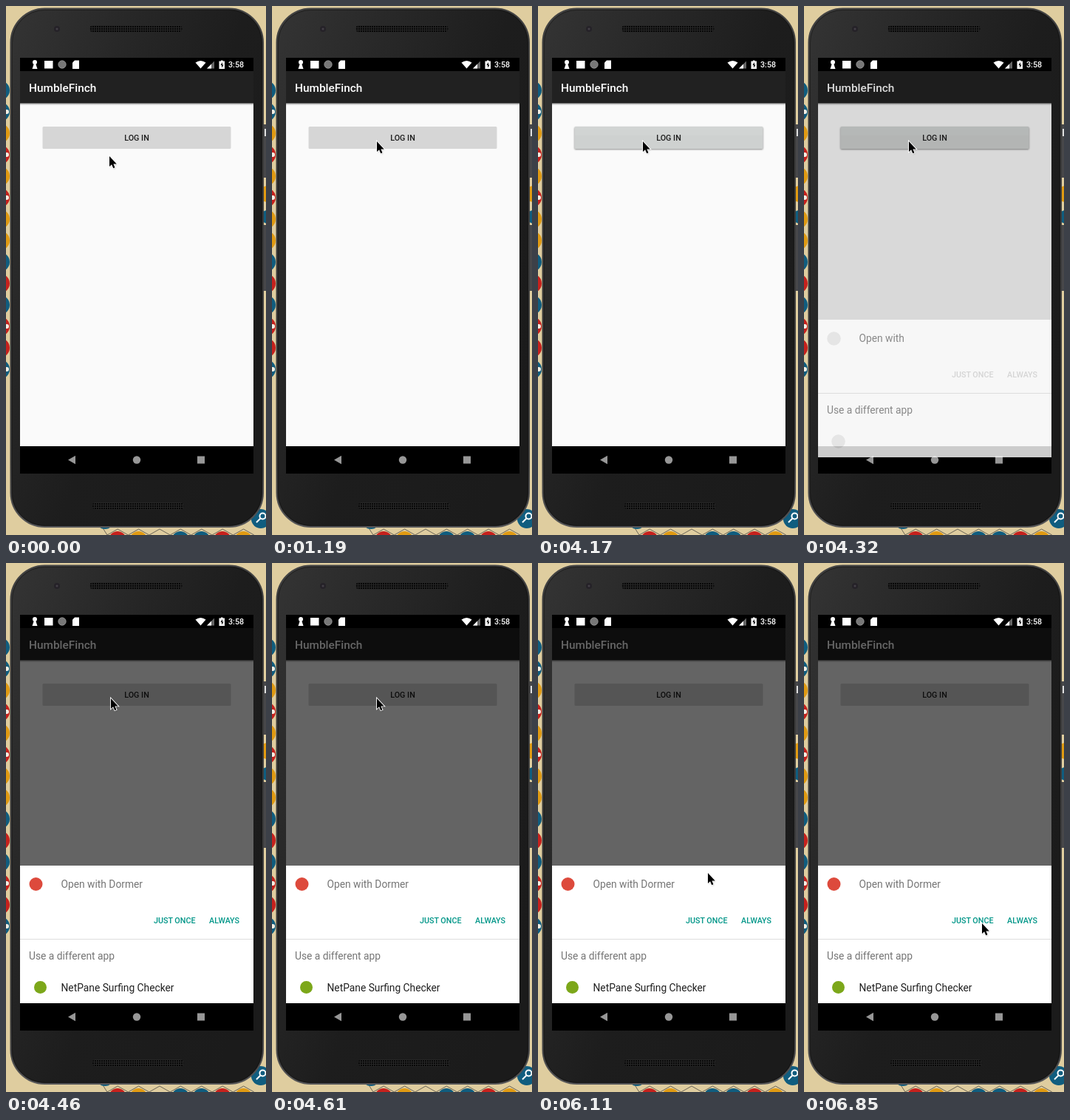
Animation, 352 px wide and 715 px high, one loop 8 s. Source, as an HTML page:

```html
<!DOCTYPE html>
<html lang="en">
<head>
<meta charset="utf-8">
<title>Log in on a phone</title>
<style>
html, body { margin: 0; width: 100%; height: 100%; overflow: hidden; background: #dfcd9f; }
svg { display: block; width: 352px; height: 715px; }
text { font-family: Roboto, "Noto Sans", sans-serif; font-size: 13.8px; }
.bold { font-weight: 500; font-size: 10.75px; }
.soft { fill: #757575; }
.r { fill: #c6211d; } .y { fill: #e09a12; } .b { fill: #105d7f; } .w { fill: #f4efe4; }

.cursor, .dim, .sheet, .early, .late, .press, .ripple, .glow, .face { animation: 8s step-end infinite; }
.cursor { animation-name: cursor; }
.dim { animation-name: dim; }
.sheet { animation-name: sheet; }
.early { animation-name: early; }
.late { animation-name: late; }
.press { animation-name: press; }
.ripple { animation-name: ripple; }
.glow { animation-name: glow; }
.face { animation-name: face; }

@keyframes cursor {
  0% { transform: translate(140px, 203px); }
  9.375% { transform: translate(139px, 198px); }
  11.25% { transform: translate(139px, 193px); }
  13% { transform: translate(140px, 189px); }
  14.875% { transform: translate(142px, 183px); }
  72.625% { transform: translate(155px, 231px); }
  74.5% { transform: translate(207px, 360px); }
  76.375% { transform: translate(230px, 419px); }
  81.875% { transform: translate(232px, 434px); }
  83.75% { transform: translate(239px, 482px); }
  85.625%, 100% { transform: translate(241px, 487px); }
}
@keyframes dim {
  0% { opacity: 0; }
  54% { opacity: .135; }
  55.75%, 100% { opacity: .6; }
}
@keyframes sheet {
  0% { opacity: 0; transform: translateY(15px); }
  54% { opacity: .8; transform: translateY(15px); }
  55.75%, 100% { opacity: 1; transform: none; }
}
@keyframes early {
  0% { visibility: hidden; }
  54% { visibility: visible; }
  55.75%, 100% { visibility: hidden; }
}
@keyframes late {
  0% { visibility: hidden; }
  55.75%, 100% { visibility: visible; }
}
@keyframes press {
  0% { opacity: 0; }
  46.625% { opacity: .6; }
  48.5% { opacity: .9; }
  55.75%, 100% { opacity: 0; }
}
@keyframes ripple {
  0% { opacity: 0; }
  46.625% { opacity: 1; }
  48.5%, 100% { opacity: 0; }
}
@keyframes glow {
  0% { opacity: 0; }
  48.5% { opacity: .3; }
  55.75%, 100% { opacity: 0; }
}
@keyframes face {
  0% { fill: #d6d6d6; }
  46.625% { fill: #d1d4d3; }
  55.75%, 100% { fill: #d6d6d6; }
}
</style>
</head>
<body>
<svg viewBox="0 0 352 715">
  <defs>
    <linearGradient id="body" x1="0" y1="0" x2="1" y2=".75">
      <stop offset="0" stop-color="#343434"/>
      <stop offset=".3" stop-color="#282828"/>
      <stop offset=".6" stop-color="#1d1d1d"/>
      <stop offset="1" stop-color="#1b1b1b"/>
    </linearGradient>
    <linearGradient id="rim" x2="0" y2="1">
      <stop offset="0" stop-color="#444"/>
      <stop offset=".1" stop-color="#3a3a3a"/>
      <stop offset=".88" stop-color="#3a3a3a"/>
      <stop offset="1" stop-color="#565658"/>
    </linearGradient>
    <linearGradient id="fall" x2="0" y2="1">
      <stop offset="0" stop-opacity=".32"/>
      <stop offset="1" stop-opacity="0"/>
    </linearGradient>
    <pattern id="mesh" width="3" height="3" patternUnits="userSpaceOnUse">
      <rect width="3" height="3" fill="#262626"/>
      <rect width="2" height="2" fill="#070707"/>
    </pattern>
    <filter id="blur" x="-10%" y="-30%" width="120%" height="160%"><feGaussianBlur stdDeviation=".9"/></filter>
    <clipPath id="button"><rect x="49.5" y="163" width="255" height="30" rx="1.5"/></clipPath>
  </defs>

  <!-- wallpaper -->
  <rect width="352" height="715" fill="#dfcd9f"/>
  <path id="comb" fill="none" stroke="#6b6557"/>
  <g id="dots"></g>
  <circle class="b" cx="345" cy="693" r="13"/>
  <g fill="none" stroke="#fff" stroke-width="2">
    <circle cx="347.5" cy="689.5" r="4"/>
    <path d="M344.5 692.5L339 698"/>
  </g>
  <circle class="y" cx="354" cy="254" r="11"/>
  <circle class="b" cx="354" cy="285" r="9"/>
  <path d="M348.5 160h3.5v72h-3.5zM348.5 296h3.5v89h-3.5z" fill="#48484a"/>
  <path d="M350 166h2v10h-2z" fill="#ddd"/>

  <!-- phone -->
  <rect x="6.5" y="3.500" width="341.500" height="700.500" rx="46" fill="url(#body)" stroke="url(#rim)" stroke-width="2"/>
  <rect x="8.500" y="5.500" width="337.500" height="696.500" rx="44" fill="none" stroke="#111" opacity=".5"/>
  <circle cx="69" cy="31" r="4" fill="#252228"/>
  <circle cx="69" cy="31" r="1.5" fill="#454048"/>
  <rect x="113.500" y="26" width="125" height="9.500" rx="4.500" fill="url(#mesh)"/>
  <rect x="117" y="671" width="123.500" height="9.500" rx="4.500" fill="url(#mesh)"/>

  <!-- screen -->
  <rect x="19" y="70" width="316" height="562"/>
  <rect x="19" y="88" width="316" height="43.500" fill="#212121"/>
  <rect x="19" y="131.500" width="316" height="463.500" fill="#fafafa"/>
  <rect x="19" y="131.500" width="316" height="3" fill="url(#fall)"/>
  <g fill="#fff">
    <circle cx="39" cy="76" r="3"/>
    <path d="M37.800 78h2.400l2.300 7h-7z"/>
    <rect x="52" y="74" width="11.500" height="10.500"/>
    <circle cx="76" cy="79" r="5.200" fill="#777" stroke="#999" stroke-width=".8"/>
    <path d="M93 73.500h6v11.500h-9v-8.500z"/>
    <path d="M256.500 76.500q7-5 14 0l-7 8z"/>
    <path d="M282 74.500v10h-10z" fill="#666"/>
    <path d="M278 78.500v6h-6z"/>
    <path d="M291 73.500h2.500v1h2.500v10.500h-7.500V74.500h2.500z"/>
    <path d="M293 76l-2.500 4h1.600v3.500l2.500-4h-1.600z" fill="#000"/>
    <text class="bold" x="301" y="83">3:58</text>
    <text x="31" y="116" style="font-size:15.400px;font-weight:500">HumbleFinch</text>
  </g>
  <g fill="#979797">
    <path d="M84 613.500l10-5.800v11.600z"/>
    <circle cx="177" cy="613.500" r="5.200"/>
    <rect x="259" y="608.500" width="10" height="10"/>
  </g>

  <!-- log in button -->
  <rect class="press" x="49.500" y="164" width="255" height="30" rx="1.500" fill="#000" fill-opacity=".5" filter="url(#blur)"/>
  <rect class="face" x="49.500" y="163" width="255" height="30" rx="1.500" fill="#d6d6d6"/>
  <g clip-path="url(#button)">
    <circle class="ripple" cx="147" cy="184" r="12.500" fill="#c2c4c3"/>
    <rect class="glow" x="49" y="175" width="255" height="18" fill="#c5c9c7"/>
  </g>
  <text class="bold" x="177" y="182" text-anchor="middle" fill="#1d1d1d">LOG IN</text>

  <rect class="dim" x="19" y="88" width="316" height="507"/>

  <!-- app chooser -->
  <g class="sheet">
    <rect x="19" y="409" width="316" height="186" fill="#fff"/>
    <rect x="19" y="508" width="316" height="1" fill="#dedede"/>
    <text class="soft" x="74.500" y="439">Open with<tspan class="late"> Dormer</tspan></text>
    <text class="soft" x="31" y="536">Use a different app</text>
    <g class="early">
      <circle cx="40.500" cy="434.500" r="9.300" fill="#e9e9e9"/>
      <circle cx="46.500" cy="573.500" r="9.300" fill="#e9e9e9"/>
      <g fill="#d4d4d4">
        <text class="bold" x="200" y="487">JUST ONCE</text>
        <text class="bold" x="275" y="487">ALWAYS</text>
      </g>
    </g>
    <g class="late">
      <circle cx="40.500" cy="434" r="9" fill="#dd4a3c"/>
      <circle cx="46.500" cy="573.500" r="8.500" fill="#7ca71a"/>
      <g fill="#009688">
        <text class="bold" x="200" y="487">JUST ONCE</text>
        <text class="bold" x="275" y="487">ALWAYS</text>
      </g>
      <text x="74.500" y="579" fill="#212121">NetPane Surfing Checker</text>
    </g>
  </g>

  <g class="cursor">
    <path d="M.5 1V15L3.700 12.300 5.900 17.300 8.200 16.400 6.100 11.500H10.500z" opacity=".3" filter="url(#blur)"/>
    <path d="M0 0V14L3.100 11.200 5.300 16.200 7.500 15.300 5.400 10.400H9.800z" stroke="#fff" stroke-width="1.800" paint-order="stroke"/>
  </g>
</svg>
<script>
const dots = document.getElementById("dots");

function dot(cx, cy, r, cls) {
  const c = document.createElementNS("http://www.w3.org/2000/svg", "circle");
  for (const [k, v] of Object.entries({ cx, cy, r, class: cls })) c.setAttribute(k, v);
  dots.append(c);
}

// Badges down the left edge; capitals also show a white glyph.
[..."bByRyRyybrbRrB"].forEach((ch, i) => {
  const y = 114 + 29 * i;
  dot(-8, y, 13, ch.toLowerCase());
  if (ch !== ch.toLowerCase()) dot(1, y, 3, "w");
});

// Badges along the bottom edge, below a honeycomb line.
[..."ry bbry"].forEach((ch, i) => {
  if (ch !== " ") dot(151 + 28.4 * i, 722, 12, ch);
});
dot(134, 695, 12, "b");
document.getElementById("comb").setAttribute("d", "M60 704H130L137 715" + "l14.2-8 14.2 8".repeat(7));
</script>
</body>
</html>
```
